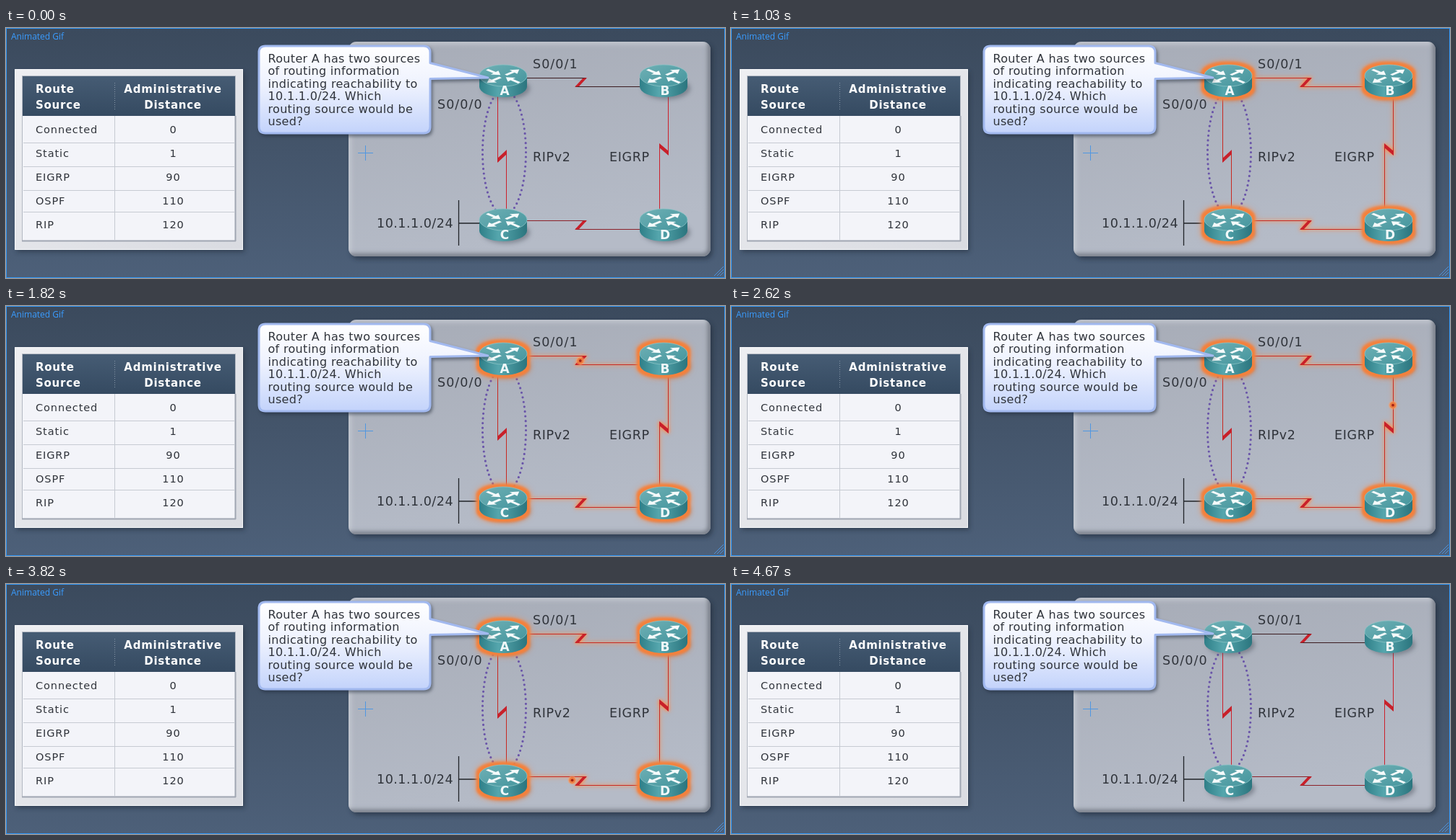
Recreate the animation shown at these times as an HTML page. Size 995x347 px, loop 5090 ms.

```html
<!DOCTYPE html>
<html lang="en">
<head>
<meta charset="utf-8">
<title>Administrative distance</title>
<style>
html, body { margin: 0; width: 100%; height: 100%; overflow: hidden; background: #435369; }
svg { display: block; width: 100vw; height: 100vh; }
text { font-family: "DejaVu Sans", sans-serif; fill: #30343b; }
.bold { font-weight: bold; font-size: 15px; letter-spacing: .75px; fill: #fff; }
.cell { font-size: 14.5px; letter-spacing: .9px; }
.label { font-size: 17.5px; letter-spacing: .65px; }
.port { letter-spacing: 1.05px; }
.bubble { font-size: 16px; letter-spacing: .32px; }
.mid { text-anchor: middle; }
.name { font-weight: bold; font-size: 17px; fill: #f0f8f9; text-anchor: middle; }
.title { font: 12px "Open Sans", sans-serif; fill: #3a9cff; }
.wire { fill: none; stroke: #cc1f2a; }
.bolt { fill: #c8202a; }
.dark { stroke: #3a1a1e; }
.dim { stroke: #8c2028; }
.glow .wire { stroke: #c82820; }
.glow .link { filter: drop-shadow(0 0 2px #ff8a48) drop-shadow(0 0 3px #f09a6c); }
.glow .router { filter: url(#halo); }
</style>
</head>
<body>
<svg id="stage" viewBox="0 0 995 347" preserveAspectRatio="none">
  <defs>
    <linearGradient id="back" x2="0" y2="1"><stop stop-color="#3b4a5d"/><stop offset="1" stop-color="#4d6079"/></linearGradient>
    <linearGradient id="panel" x2=".3" y2="1"><stop stop-color="#a7acb7"/><stop offset="1" stop-color="#b5bbc7"/></linearGradient>
    <linearGradient id="head" x2="0" y2="1"><stop stop-color="#465c74"/><stop offset="1" stop-color="#354a61"/></linearGradient>
    <linearGradient id="frame" x2="1" y2="1"><stop stop-color="#eeeff2"/><stop offset="1" stop-color="#d9dbe1"/></linearGradient>
    <linearGradient id="talk" x2="0" y2="1"><stop stop-color="#fff"/><stop offset=".45" stop-color="#eef2fe"/><stop offset="1" stop-color="#c3d3fb"/></linearGradient>
    <linearGradient id="side"><stop stop-color="#2f7f88"/><stop offset=".4" stop-color="#55a6ad"/><stop offset="1" stop-color="#2b757e"/></linearGradient>
    <linearGradient id="lid" x2="1" y2="1"><stop stop-color="#6fb0b5"/><stop offset="1" stop-color="#44959d"/></linearGradient>
    <filter id="soft" x="-20%" y="-20%" width="140%" height="140%"><feGaussianBlur stdDeviation="3"/></filter>
    <filter id="halo" x="-30%" y="-40%" width="160%" height="180%" color-interpolation-filters="sRGB">
      <feMorphology in="SourceAlpha" operator="dilate" radius="3.500" result="wide"/>
      <feGaussianBlur in="wide" stdDeviation="1.400" result="ring"/>
      <feGaussianBlur in="wide" stdDeviation="4" result="haze"/>
      <feFlood flood-color="#f4813c"/><feComposite in2="ring" operator="in" result="a"/>
      <feFlood flood-color="#f08a50" flood-opacity=".8"/><feComposite in2="haze" operator="in" result="b"/>
      <feMerge><feMergeNode in="b"/><feMergeNode in="a"/><feMergeNode in="SourceGraphic"/></feMerge>
    </filter>
    <clipPath id="inside"><rect x="474" y="19" width="501" height="298" rx="11"/></clipPath>
    <path id="arrow" d="M0-2.500H14V-8L25 0L14 8V2.500H0Z" fill="#f4fafa"/>
    <g id="body">
      <path d="M-33 0V15.500A33 14.500 0 0 0 33 15.500V0Z" fill="url(#side)"/>
      <ellipse rx="33" ry="15" fill="url(#lid)" stroke="#8cc4c7" stroke-width=".8"/>
      <g transform="translate(0 .8) scale(1 .46)">
        <use href="#arrow" transform="rotate(-42) translate(5 0)"/>
        <use href="#arrow" transform="rotate(138) translate(5 0)"/>
        <use href="#arrow" transform="rotate(222) translate(30 0) rotate(180)"/>
        <use href="#arrow" transform="rotate(42) translate(30 0) rotate(180)"/>
      </g>
    </g>
  </defs>

  <rect width="995" height="347" fill="url(#back)"/>
  <text class="title" x="7" y="16">Animated Gif</text>

  <g id="table">
    <rect x="15" y="61" width="315" height="250" fill="#1d2836" opacity=".5" filter="url(#soft)"/>
    <rect x="12.500" y="57.500" width="315" height="250" fill="url(#frame)" stroke="#f8f9fb"/>
    <rect x="22.500" y="66.500" width="295" height="229" fill="#f3f4f9" stroke="#b4b9c3"/>
    <path d="M22 295.500H318M317.500 122V296" stroke="#a0a6b2" stroke-width="2"/>
    <rect x="23" y="67" width="294" height="55" fill="url(#head)"/>
    <path d="M150.500 76V114" stroke="#8797a8" stroke-dasharray="1 2"/>
    <path d="M150.500 122V294M24 159.500H316M24 192.500H316M24 225.500H316M24 255.500H316" stroke="#c6cad2"/>
    <text class="bold" x="41" y="90">Route</text>
    <text class="bold" x="41" y="112">Source</text>
    <text class="bold mid" x="231" y="90">Administrative</text>
    <text class="bold mid" x="231" y="112">Distance</text>
  </g>

  <rect x="477" y="22" width="501" height="299" rx="11" fill="#1c2634" opacity=".55" filter="url(#soft)"/>
  <g clip-path="url(#inside)" fill="none" stroke-width="7">
    <rect x="474" y="19" width="501" height="298" fill="url(#panel)"/>
    <rect x="474" y="19" width="515" height="312" rx="11" stroke="#d0d4db" opacity=".7" filter="url(#soft)"/>
    <rect x="460" y="5" width="515" height="312" rx="11" stroke="#6d737e" filter="url(#soft)"/>
  </g>
  <path d="M487 173.500H508M497.500 163V184" stroke="#4f97e2"/>

  <g id="net">
    <g class="link">
      <path class="wire dark" d="M718 69.500H803L788 81.500H882"/>
      <path class="bolt" d="M804 69L798 70L787 82L793 81Z"/>
      <path class="wire" d="M916.500 92V176L904.500 162V254"/>
      <path class="bolt" d="M917 177V171L904 160V166Z"/>
      <path class="wire dim" d="M718 267.500H803L788 279.500H882"/>
      <path class="bolt" d="M804 267L798 268L787 280L793 279Z"/>
    </g>
    <path class="wire" d="M680.500 92V186L692.500 171V254"/>
    <path class="bolt" d="M680 187V181L693 169V175Z"/>
    <path d="M626.500 239V302M627 271H660" stroke="#202328" stroke-width="1.300"/>
    <ellipse cx="689.500" cy="172.500" rx="30" ry="87" fill="none" stroke="#6a55a9" stroke-width="3.200" stroke-linecap="round" stroke-dasharray="0 6.600"/>
    <g id="dot">
      <circle r="6" fill="#ff9a5c" opacity=".55"/>
      <circle r="4.300" fill="#ee7d40"/>
      <circle r="1.900" fill="#a52316"/>
    </g>
    <g id="routers"></g>
  </g>

  <text class="label port" x="729" y="56">S0/0/1</text>
  <text class="label port" x="597" y="112">S0/0/0</text>
  <text class="label" x="729" y="185">RIPv2</text>
  <text class="label" x="835" y="185">EIGRP</text>
  <text class="label" x="513" y="277" style="letter-spacing:.5px">10.1.1.0/24</text>

  <g id="bubble">
    <path d="M359 25H578Q587 25 587 34V48.500L667 69L587 70.500V137Q587 146 578 146H359Q350 146 350 137V34Q350 25 359 25Z"
      fill="url(#talk)" stroke="#a2b9ef" stroke-width="3" stroke-linejoin="round"
      style="filter:drop-shadow(2px 3px 2px #1c263680)"/>
  </g>

  <path d="M980 344L993 331M984 344L993 335M988 344L993 339" stroke="#4f93dc"/>
  <rect x=".5" y=".5" width="994" height="346" fill="none" stroke="#3397f5"/>
</svg>
<script>
const byId = id => document.getElementById(id);
const add = (id, markup) => byId(id).insertAdjacentHTML("beforeend", markup);

const rows = [["Connected", 0], ["Static", 1], ["EIGRP", 90], ["OSPF", 110], ["RIP", 120]];
rows.forEach(([source, distance], i) => {
  const y = 146 + 33 * i;
  add("table", `<text class="cell" x="41" y="${y}">${source}</text>
    <text class="cell mid" x="231.500" y="${y}">${distance}</text>`);
});

const question = ["Router A has two sources", "of routing information", "indicating reachability to",
  "10.1.1.0/24. Which", "routing source would be", "used?"];
question.forEach((line, i) =>
  add("bubble", `<text class="bubble" x="362.500" y="${48 + 17.4 * i}">${line}</text>`));

[["A", 688, 66], ["B", 910, 66], ["C", 688, 266], ["D", 910, 266]].forEach(([name, x, y]) =>
  add("routers", `<g transform="translate(${x} ${y})">
    <ellipse cx="4" cy="18" rx="33" ry="15" fill="#4c535f" opacity=".5" filter="url(#soft)"/>
    <use class="router" href="#body"/>
    <text class="name" x="2" y="27">${name}</text></g>`));

// The packet travels A, B, D, C and passes behind the routers.
const route = document.createElementNS("http://www.w3.org/2000/svg", "path");
route.setAttribute("d", "M690 69L795 76L916 81V162L905 175V279L795 273L690 267");

const LOOP = 5090, GLOW_ON = 1030, GLOW_OFF = 4670;
const hops = [1410, 1820, 2220, 2620, 3020, 3420, 3820, 4220];

function draw(now) {
  const t = now % LOOP;
  byId("net").classList.toggle("glow", t >= GLOW_ON && t < GLOW_OFF);
  const hop = hops.filter(h => t >= h).length - 1;
  const moving = hop >= 0 && hop < hops.length - 1;
  byId("dot").style.display = moving ? "" : "none";
  if (moving) {
    const p = route.getPointAtLength(16 + 89 * hop);
    byId("dot").setAttribute("transform", `translate(${p.x} ${p.y})`);
  }
}

const start = performance.now();
function tick() {
  draw(performance.now() - start);
  requestAnimationFrame(tick);
}
tick();
</script>
</body>
</html>
```
